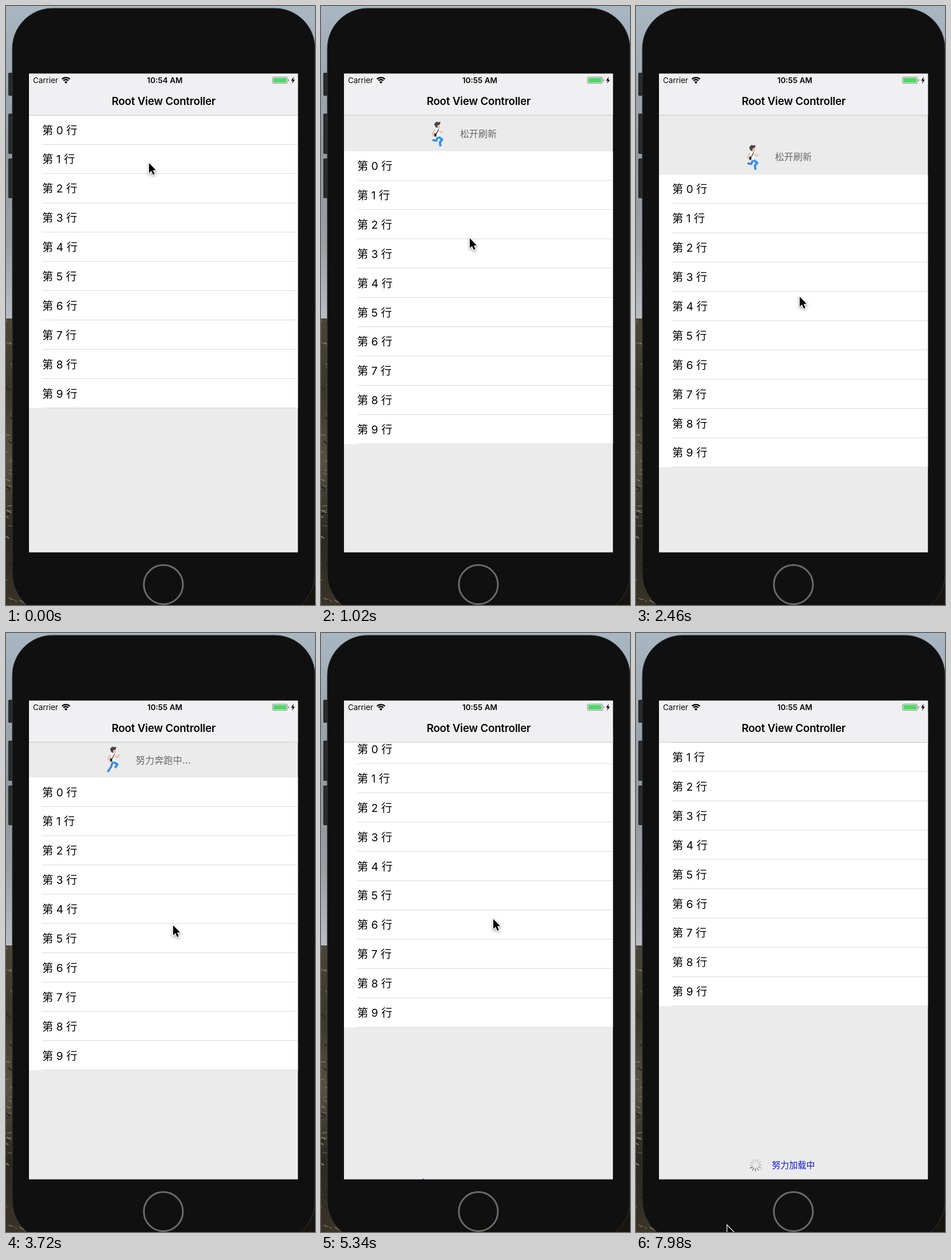
These frames come from a looping animation (538 px wide and 1041 px high, 8 s). An HTML page with a canvas:

```html
<!DOCTYPE html>
<html lang="zh-CN">
<head>
<meta charset="utf-8">
<style>
html, body { margin: 0; width: 100%; height: 100%; overflow: hidden; background: #101010; }
canvas { display: block; }
</style>
</head>
<body>
<canvas id="stage" width="538" height="1041"></canvas>
<script>
const ctx = document.getElementById('stage').getContext('2d');
const LOOP = 8000, STEP = 60;
const TOP = 190, ROW = 50.89, HEADER = 61, LEFT = 40, RIGHT = 508.5;
const FONT = 'Inter, "Noto Sans CJK SC", "Noto Sans CJK", sans-serif';
const BLUE = '#1018d8', SKIN = '#efbda4';

const linear = u => u;
const easeOut = u => 1 - (1 - u) ** 3;
const easeIn = u => u * u;
const smooth = u => u * u * (3 - 2 * u);

// Keys: [time, value, easing into this key]
const scrollKeys = [[90, 0], [600, 41, linear], [1000, 62, linear], [1620, 79.5, linear],
  [2580, 104, smooth], [3120, HEADER, easeOut], [4500, HEADER], [4920, 0, easeOut],
  [5160, 0], [5340, -13.5, linear], [5800, -52, linear], [6120, -61, easeOut],
  [6300, -62], [6660, -50.3, easeOut]];
const cursorX = [[0, 249], [600, 257, linear], [1620, 262, linear], [2580, 286, smooth],
  [3360, 291, easeOut], [5040, 291], [5340, 300, smooth], [6120, 299, linear],
  [6780, 300], [7560, 347, smooth], [7980, 159, easeIn]];
const cursorY = [[0, 273], [600, 376, linear], [1620, 443, linear], [2580, 508, smooth],
  [5100, 508], [5340, 497, linear], [6120, 444, smooth], [6720, 442],
  [7560, 332, smooth], [7980, 1030, easeIn]];

function track(keys, t) {
  const next = keys.findIndex(k => k[0] > t);
  if (next === 0) return keys[0][1];
  if (next < 0) return keys[keys.length - 1][1];
  const [t0, a] = keys[next - 1], [t1, b, ease = linear] = keys[next];
  return a + (b - a) * ease((t - t0) / (t1 - t0));
}

function box(x, y, w, h, color, radius = 0) {
  ctx.fillStyle = color;
  ctx.beginPath();
  ctx.roundRect(x, y, w, h, radius);
  ctx.fill();
}

function line(points, color, width) {
  ctx.strokeStyle = color;
  ctx.lineWidth = width;
  ctx.beginPath();
  points.forEach(([x, y]) => ctx.lineTo(x, y));
  ctx.stroke();
}

function shape(points, color) {
  ctx.fillStyle = color;
  ctx.beginPath();
  points.forEach(([x, y]) => ctx.lineTo(x, y));
  ctx.closePath();
  ctx.fill();
}

function circle(x, y, r, color) {
  ctx.fillStyle = color;
  ctx.beginPath();
  ctx.arc(x, y, r, 0, 7);
  ctx.fill();
}

function text(str, x, y, size, { weight = 400, color = '#050505', align = 'left', spacing = 0 } = {}) {
  ctx.font = `${weight} ${size}px ${FONT}`;
  ctx.letterSpacing = spacing + 'px';
  ctx.textAlign = align;
  ctx.fillStyle = color;
  ctx.fillText(str, x, y);
}

function gradient(y0, y1, ...colors) {
  const g = ctx.createLinearGradient(0, y0, 0, y1);
  colors.forEach((c, i) => g.addColorStop(i / (colors.length - 1), c));
  return g;
}

function drawBackdrop() {
  box(0, 0, 538, 545, gradient(0, 545, '#a9b7c3', '#9ca8b1', '#90989e', '#9a9fa4', '#b9bec5'));
  box(0, 543, 538, 498, gradient(543, 1041, '#4b4636', '#3b3729', '#575141', '#2b281f', '#3a3427'));
  let seed = 7;
  const rand = () => (seed = seed * 16807 % 2147483647) / 2147483647;
  for (let i = 0; i < 80; i++) {
    const x = rand() * 34 - 6, y = 546 + rand() * 490, len = 5 + rand() * 9;
    line([[x, y], [x + len, y + len * (rand() - .2)]],
      ['#6e6753', '#1f1d16', '#827a65'][i % 3], .8 + rand() * 1.5);
  }
  box(500, 985, 38, 56, '#17130f');
}

function drawPhone() {
  for (const [y, h] of [[116, 40], [187, 70], [265, 69]]) box(4, y, 9, h, '#282a2c', 2);
  box(11, 4, 527, 1053, '#101010', 70);
  ctx.strokeStyle = '#34373a';
  ctx.lineWidth = 1;
  ctx.stroke();
  ctx.strokeStyle = '#6b6a65';
  ctx.lineWidth = 3;
  ctx.beginPath();
  ctx.arc(274, 1005.5, 34, 0, 7);
  ctx.stroke();
}

function drawBar(t) {
  box(LEFT, 117.5, RIGHT - LEFT, TOP - 117.5, '#f0f0f2');
  box(LEFT, TOP - .5, RIGHT - LEFT, 1, '#c5c5c8');
  text('Carrier', 47, 134, 13.4);
  ctx.strokeStyle = '#000';
  ctx.lineWidth = 2.3;
  for (const r of [6, 9.7]) {
    ctx.beginPath();
    ctx.arc(104.3, 134, r, -2.36, -.78);
    ctx.stroke();
  }
  shape([[104.3, 135], [101.5, 131.8], [104.3, 130.7], [107.1, 131.8]], '#000');
  text(t < 1000 ? '10:54 AM' : '10:55 AM', 276.5, 134, 13.5, { weight: 600, align: 'center' });
  box(463.5, 123, 27, 12, '#8e8e91', 3);
  box(464.5, 124, 25, 10, '#f0f0f2', 2);
  box(465.5, 125, 23, 8, '#4cd964', 1.5);
  box(491.3, 127, 1.5, 4, '#8e8e91', 1);
  shape([[501, 123], [496.3, 129.7], [499.2, 129.7], [498, 135], [503, 128], [500, 128]], '#000');
  text('Root View Controller', 274.5, 171.7, 18.7, { weight: 600, align: 'center', spacing: -.22 });
}

const poses = [
  { dy: 1, front: [[0, 4], [5, 10], [-1, 20]], back: [[0, 4], [-2, 12], [-9, 15]], arm: [[3, -7], [6, -2], [10, -5]] },
  { dy: 0, front: [[-1, 3], [7, 8], [3, 14]], back: [[-1, 3], [-4, 12], [-10, 21]], arm: [[3, -7], [6, -4], [11, -9]] },
  { dy: 2, front: [[1, 5], [8, 10], [4, 15], [5, 22]], back: [[0, 6], [-2, 12], [-9, 11]], arm: [[3, -7], [5, -5], [10, -5]] }
];

function drawRunner(x, y, { dy, front, back, arm }) {
  ctx.save();
  ctx.translate(x, y);
  ctx.lineCap = 'butt';
  ctx.lineJoin = 'round';
  line(back, '#3a86dc', 3.5);
  line(front, '#3490ee', 4);
  ctx.translate(0, dy);
  line([[-4, -9], [-9, -2], [-7, 1]], SKIN, 2.5);
  shape([[-4, -12], [4, -11], [3, 3], [-5, 3]], '#fbfbfc');
  line([[2, -10], [-4, 1]], '#33343a', 1.3);
  box(-6, -3, 4, 6, '#33343a', 1.5);
  line(arm, SKIN, 2.5);
  box(-1, -18, 5, 7, SKIN, 2);
  shape([[-6, -19], [-2, -23], [2, -22], [5, -23], [4, -18], [0, -17], [-1, -12], [-4, -14]], '#45464a');
  ctx.restore();
}

function drawHeader(t, scroll) {
  const y = TOP + scroll - HEADER / 2;
  const refreshing = t >= 2580 && t < 4500;
  const pulling = t < 2580 && scroll > HEADER;
  const label = refreshing ? '努力奔跑中...' : pulling ? '松开刷新' : '下拉刷新';
  const x = refreshing ? 226 : 242;
  const index = refreshing || pulling ? Math.floor(t / 120) : Math.floor(scroll / 15);
  drawRunner(x - 39, y, poses[index % 3]);
  text(label, x, y + 6, 16, { weight: 500, color: '#69696b', spacing: refreshing ? .2 : 0 });
}

function drawList(scroll) {
  const top = TOP + scroll;
  box(LEFT, top, RIGHT - LEFT, ROW * 10, '#fff');
  for (let i = 0; i < 10; i++) {
    const y = top + i * ROW;
    text(`第 ${i} 行`, 63, y + 32.5, 19.2);
    box(63, y + ROW - 1, RIGHT - 63, 1, '#d9d9dc');
  }
}

function drawSpinner(x, y, t) {
  const head = Math.floor(t / 83.33) + 6;
  ctx.lineCap = 'round';
  for (let i = 0; i < 12; i++) {
    const a = (head - i) * Math.PI / 6, c = Math.cos(a), s = Math.sin(a);
    line([[x + 6 * c, y + 6 * s], [x + 10.3 * c, y + 10.3 * s]],
      `rgba(105,105,110,${Math.max(.25, .85 - i * .1)})`, 1.9);
  }
  ctx.lineCap = 'butt';
}

function drawFooter(t, scroll) {
  const y = 975 + scroll;
  const loading = t >= 6300, ready = t >= 5800;
  const label = loading ? '努力加载中' : ready ? '松开立即加载更多' : '点击或上拉加载更多';
  const x = 274 - label.length * 7.5;
  text(label, x, y + 5.5, 15, { weight: 500, color: BLUE });
  if (loading) return drawSpinner(x - 28.5, y, t);
  ctx.save();
  ctx.translate(x - 28.5, y);
  ctx.rotate(Math.PI * (1 - smooth(Math.min(1, Math.max(0, (t - 5800) / 250)))));
  ctx.lineJoin = 'miter';
  line([[0, -13], [0, 12]], BLUE, 1.8);
  line([[-7.5, 5], [0, 12.3], [7.5, 5]], BLUE, 1.8);
  ctx.restore();
}

function drawCursor(x, y) {
  const outline = [[0, 0], [0, 17.2], [4, 13.6], [7, 20.2], [9.8, 19], [6.9, 12.6], [12, 12.3]];
  ctx.save();
  ctx.translate(x, y);
  ctx.lineJoin = 'miter';
  ctx.shadowColor = 'rgba(0,0,0,.4)';
  ctx.shadowBlur = 4;
  ctx.shadowOffsetY = 2;
  line([...outline, outline[0], outline[1]], '#fff', 2.4);
  ctx.shadowColor = 'transparent';
  shape(outline, '#000');
  ctx.restore();
}

function draw(t) {
  const scroll = track(scrollKeys, t);
  drawBackdrop();
  drawPhone();
  ctx.save();
  ctx.beginPath();
  ctx.rect(LEFT, 117.5, RIGHT - LEFT, 832);
  ctx.clip();
  box(LEFT, 117, RIGHT - LEFT, 833, '#ebebec');
  if (scroll > 0) drawHeader(t, scroll);
  drawList(scroll);
  if (scroll < 0) drawFooter(t, scroll);
  drawBar(t);
  ctx.restore();
  drawCursor(track(cursorX, t), track(cursorY, t));
}

function tick() {
  draw(Math.floor(performance.now() % LOOP / STEP) * STEP);
  requestAnimationFrame(tick);
}
tick();
</script>
</body>
</html>
```
